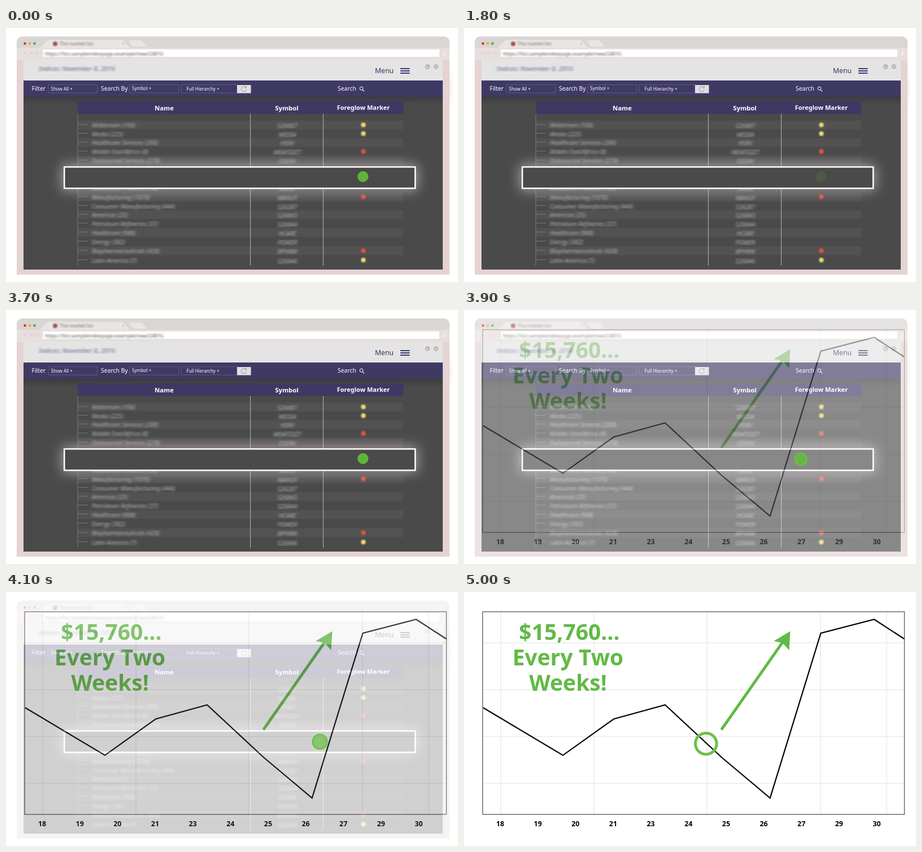
Animation, 800 px wide and 450 px high, one loop 5.1 s. Source, as an HTML page:

```html
<!DOCTYPE html>
<html lang="en">
<head>
<meta charset="utf-8">
<title>Signal table and chart</title>
<style>
  html, body { margin: 0; width: 100%; height: 100%; overflow: hidden; background: #fff; }
  svg { display: block; width: 800px; height: 450px; font-family: "Noto Sans", "Open Sans", sans-serif; }
  .mid { text-anchor: middle; }
  .bar { fill: #fff; font-size: 10.4px; font-weight: 500; }
  .small { fill: #fff; font-size: 8px; }
  .head { fill: #fff; font-size: 11.4px; font-weight: 600; }
  .rows { fill: #b4b4b4; font-size: 10.6px; font-style: italic; font-weight: 500; }
  .big { fill: #62b946; font-size: 39px; font-weight: 700; }
  .days { font-size: 12.4px; font-weight: 600; }
</style>
</head>
<body>
<svg viewBox="0 0 800 450">
  <defs>
    <filter id="smear" x="-20%" y="-60%" width="140%" height="220%"><feGaussianBlur stdDeviation="1.9 0.8"/></filter>
    <filter id="soft" x="-50%" y="-50%" width="200%" height="200%"><feGaussianBlur stdDeviation="0.8"/></filter>
    <filter id="glow" x="-10%" y="-150%" width="120%" height="400%"><feGaussianBlur stdDeviation="11"/></filter>
    <linearGradient id="shade" x2="0" y2="1">
      <stop stop-color="#3c3c3e"/><stop offset="1" stop-color="#4a4a4a"/>
    </linearGradient>
    <clipPath id="page"><rect x="31" y="122" width="742" height="306"/></clipPath>
  </defs>

  <!-- browser window -->
  <rect x="772" y="86" width="16" height="42" fill="#e4d3d2" opacity=".6" filter="url(#glow)"/>
  <path d="M19 437V27Q19 15 31 15H773Q785 15 785 27V437Z" fill="#e4d3d2"/>
  <path d="M19 36V27Q19 15 31 15H773Q785 15 785 27V36Z" fill="#d9d6d3"/>
  <rect x="19" y="35" width="766" height="22" fill="#e7dfdd"/>
  <path d="M60 35L72 23Q74 21 78 21H204Q208 21 210 24L219 35Z" fill="#e9e5e3"/>
  <path d="M217 22H238Q241 22 243 25L249 33H228Q225 33 223 31Z" fill="#e9e5e3"/>
  <circle cx="33.5" cy="27.5" r="2.2" fill="#d8282f"/>
  <circle cx="42" cy="27.5" r="2.2" fill="#e8ad22"/>
  <circle cx="50.5" cy="27.5" r="2.2" fill="#45a83a"/>
  <circle cx="87" cy="28" r="4" fill="#a8504c" filter="url(#soft)"/>
  <text x="95" y="31" font-size="8.5" fill="#77706e" filter="url(#smear)">The market list</text>
  <path d="M206 25.5l4 4m0-4l-4 4" stroke="#c0bab8"/>
  <path d="M36 44.5H31m2-2l-2 2 2 2M42 44.5h5m-2-2l2 2-2 2" stroke="#d5cbc9" fill="none"/>
  <circle cx="55" cy="44.5" r="2.5" stroke="#d5cbc9" fill="none"/>
  <rect x="65" y="38" width="702" height="13" fill="#fff"/>
  <text x="69" y="49" font-size="9" font-weight="500" fill="#555" filter="url(#smear)">https://list.sampleindexpage.example/new/24816</text>
  <path d="M776 41v1.6m0 1.4v1.6m0 1.4v1.6" stroke="#fff" stroke-width="2"/>

  <!-- page header and filters -->
  <rect x="31" y="57" width="742" height="36" fill="#e4e4e4"/>
  <text x="58" y="76" font-size="11.5" font-weight="500" font-style="italic" fill="#69658f" filter="url(#smear)">Indices: November 8, 2016</text>
  <text x="653" y="80" font-size="12.2" fill="#37335f">Menu</text>
  <path d="M698 72h16.5m-16.5 4h16.5m-16.5 4h16.5" stroke="#3c3674" stroke-width="2"/>
  <g fill="none" stroke="#77777b" stroke-width=".8">
    <circle cx="746" cy="68.5" r="3.6"/><path d="M744.5 70l3-3m-2 0h2v2"/>
    <circle cx="761" cy="68.5" r="3.6"/><path d="M759.5 67l3 3m0-3l-3 3"/>
  </g>
  <rect x="31" y="93" width="742" height="29" fill="#3f3a64"/>
  <g fill="none" stroke="#66618b" stroke-width=".8">
    <rect x="75" y="100.5" width="86.5" height="14.5"/>
    <rect x="218.5" y="100.5" width="87" height="14.5"/>
    <rect x="310" y="100.5" width="99" height="14.5"/>
  </g>
  <g class="bar">
    <text x="45.5" y="111">Filter</text>
    <text x="168" y="111">Search By</text>
    <text x="587" y="111">Search</text>
  </g>
  <g class="small">
    <text x="79.5" y="110.5">Show All +</text>
    <text x="223" y="110">Symbol +</text>
    <text x="319.5" y="110.5">Full Hierarchy +</text>
  </g>
  <rect x="409" y="101" width="24.5" height="14.5" fill="#e0e0e2"/>
  <path d="M424.6 105.2a4.6 4.6 0 1 0 .8 4M425.3 103v3h-3" fill="none" stroke="#85858d" stroke-width=".9"/>
  <path d="M631 109.3l3 3" stroke="#fff" stroke-width="1.2"/>
  <circle cx="629" cy="107" r="2.9" fill="none" stroke="#fff"/>

  <!-- table -->
  <rect x="31" y="122" width="742" height="306" fill="#4a4a4a"/>
  <rect x="31" y="122" width="742" height="14" fill="url(#shade)"/>
  <g id="stripes" fill="#525252"></g>
  <rect x="127" y="130" width="576.5" height="22.5" fill="#3e3964"/>
  <g class="head mid">
    <text x="280" y="146">Name</text>
    <text x="497" y="146">Symbol</text>
    <text x="632.5" y="145" font-size="11">Foreglow Marker</text>
  </g>
  <path id="tree" fill="none" stroke="#7d7d7d" stroke-width=".9"/>
  <path d="M432.5 152V421M561.5 152V421" stroke="#b5b5b5"/>
  <g id="rows" class="rows"></g>
  <g id="lights" filter="url(#soft)"></g>
  <g clip-path="url(#page)">
    <rect x="99" y="242" width="629" height="46" fill="#e6d2d6" opacity=".6" filter="url(#glow)"/>
  </g>
  <rect x="103.2" y="246.2" width="621" height="37.8" fill="#4a4a4a" stroke="#fff" stroke-width="2.5"/>

  <!-- chart -->
  <g id="chart">
    <rect width="800" height="450" fill="#fff"/>
    <path d="M65 35V394M230 35V394M430 35V394M631 35V394M748 35V394M33 90H779M33 173H779M33 256H779M33 339H779" stroke="#ebebeb" stroke-width="1.5"/>
    <rect x="33" y="35" width="746.5" height="359" fill="none" stroke="#555" stroke-width="1.3"/>
    <path d="M34 205L175 289.3 265 225 356 200 456 293 541.7 365 631.5 73 726 48.5 779 83" fill="none" stroke="#000" stroke-width="2.2"/>
    <path d="M455.5 244L566 86" stroke="#62b946" stroke-width="5"/>
    <path d="M577.5 69.5L548 87 563.5 90 575.5 103Z" fill="#62b946"/>
    <g class="big mid">
      <text x="186.5" y="85">$15,760…</text>
      <text x="184" y="130">Every Two</text>
      <text x="184" y="175">Weeks!</text>
    </g>
    <g id="days" class="days mid"></g>
  </g>
  <g id="dot">
    <circle id="fill" fill="#62bd37"/>
    <circle id="ring" fill="none" stroke="#6cc04a"/>
  </g>
</svg>
<script>
const $ = id => document.getElementById(id);
const LOOP = 5100, STEP = 100, BLINK = 750, MOVE = 3725;

const rows = [
  [172, "Midstream (106)", "S26887", "y"],
  [187.5, "Media (225)", "MEDIA", "y"],
  [203, "Healthcare Services (288)", "HSRV"],
  [219, "Middle East/Africa (8)", "MEAFSDZ7", "r"],
  [235, "Outsourced Services (278)", "OSERV"],
  [284, "Investment Finance (130)", "INFIN"],
  [299.5, "Manufacturing (1070)", "MANUF", "r"],
  [315.5, "Consumer Manufacturing (444)", "S26287"],
  [331, "Americas (25)", "S26843"],
  [346.5, "Petroleum Refineries (37)", "S26844"],
  [362.5, "Healthcare (988)", "HCARE"],
  [378.5, "Energy (382)", "POWER"],
  [395, "Biopharmaceuticals (428)", "BPHRM", "r"],
  [411.5, "Latin America (7)", "S26846", "y"]
];
const lightColor = { y: "#ecda6c", r: "#e0533d" };
let tree = "M127 152V421";
rows.forEach(([y, name, code, light], i) => {
  if (i % 2 == 0 && i != 4 || i == 4)
    $("stripes").innerHTML += i == 5 ? "" : `<rect x="127" y="${y - 8}" width="576" height="15.5"/>`;
  tree += `M127 ${y - 1}h18`;
  $("rows").innerHTML += `<g filter="url(#smear)"><text x="152" y="${y + 4}">${name}</text>
    <text x="498" y="${y + 5}" class="mid">${code}</text></g>`;
  if (light) $("lights").innerHTML += `<circle cx="632.5" cy="${y - .3}" r="4.1" fill="${lightColor[light]}"/>`;
});
$("tree").setAttribute("d", tree);

[18, 19, 20, 21, 23, 24, 25, 26, 27, 29, 30].forEach((day, i) => {
  $("days").innerHTML += `<text x="${64 + i * 66.65}" y="415">${day}</text>`;
});

const clamp = v => Math.min(1, Math.max(0, v));
const mix = (a, b, k) => a + (b - a) * k;
function set(id, attrs) {
  for (const key in attrs) $(id).setAttribute(key, attrs[key]);
}

function draw(t) {
  const k = clamp((t - MOVE) / 1000);
  const blink = Math.abs((t + 25) % BLINK - BLINK / 2) / (BLINK / 2);
  const r = mix(9.6, 21.3, k), width = mix(1, 5, k);
  set("chart", { opacity: clamp((t - MOVE - 5) / 500) });
  set("dot", {
    transform: `translate(${mix(631.8, 428.3, k)} ${mix(263.3, 268.7, k)})`,
    opacity: t < MOVE ? blink : 1
  });
  set("fill", { r, opacity: 1 - k });
  set("ring", { r: r - width / 2, "stroke-width": width, opacity: k ? 1 : 0 });
}

function tick() {
  draw(Math.floor(performance.now() % LOOP / STEP) * STEP);
  requestAnimationFrame(tick);
}
tick();
</script>
</body>
</html>
```
